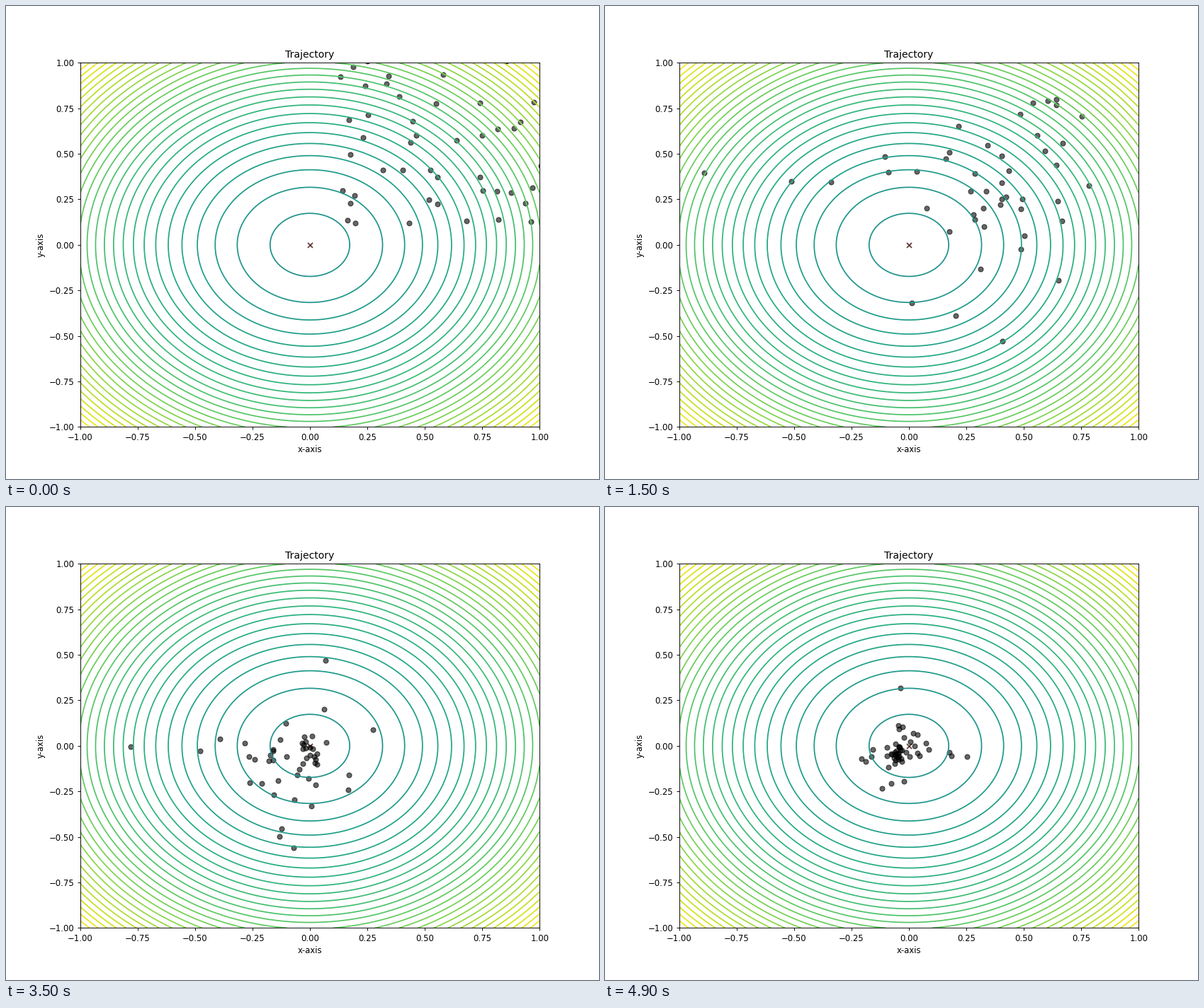
These frames come from a looping animation (837 px wide and 669 px high, 5 s). A matplotlib script:

```python
import numpy as np
import matplotlib.pyplot as plt
from matplotlib.animation import FuncAnimation

DPI = 83.7
FRAMES = 50
PARTICLES = 50
INERTIA, COGNITIVE, SOCIAL = 0.9, 0.5, 0.3


def sphere(points):
    return (points ** 2).sum(axis=-1)


def swarm_track(steps, seed=11):
    """Positions of a particle swarm minimising the sphere function."""
    rng = np.random.default_rng(seed)
    pos = rng.uniform(size=(PARTICLES, 2))
    vel = rng.uniform(size=pos.shape)
    best = pos.copy()
    track = []
    for _ in range(steps):
        better = sphere(pos) < sphere(best)
        best[better] = pos[better]
        leader = best[sphere(best).argmin()]
        track.append(pos)
        own, group = rng.uniform(0.2, 0.8, size=(2, *pos.shape))
        vel = (INERTIA * vel + COGNITIVE * own * (best - pos)
               + SOCIAL * group * (leader - pos))
        pos = pos + vel
    return np.array(track)


def settle(track):
    """Swing the whole swarm through the minimum while it contracts."""
    step = np.arange(len(track))[:, None, None]
    centre = 1.15 * np.exp(-step / 13.6) * np.cos(2 * np.pi * (step - 2.3) / 13.4)
    spread = (0.29 + 0.05 * step) * np.exp(-step / 14)
    mean = track.mean(axis=1, keepdims=True)
    std = track.std(axis=1, keepdims=True)
    return centre + spread * (track - mean) / std


track = settle(swarm_track(FRAMES))

fig, ax = plt.subplots(figsize=(10, 7.993), dpi=DPI)
ax.set_title("Trajectory", fontsize="large")
ax.set_xlabel("x-axis", fontsize="medium")
ax.set_ylabel("y-axis", fontsize="medium")

axis = np.linspace(-1, 0.999, 301)
xx, yy = np.meshgrid(axis, axis)
ax.contour(xx, yy, xx ** 2 + yy ** 2, levels=np.arange(-2.0, 2.0, 0.07))
ax.scatter(0, 0, color="#5f3a36", marker="x")
dots = ax.scatter(*track[0].T, c="black", alpha=0.6)
ax.set(xlim=(-1, 1), ylim=(-1, 1))


def update(step):
    dots.set_offsets(track[step])
    return (dots,)


anim = FuncAnimation(fig, update, frames=FRAMES, interval=100,
                     repeat=True, repeat_delay=0)
plt.show()
```
